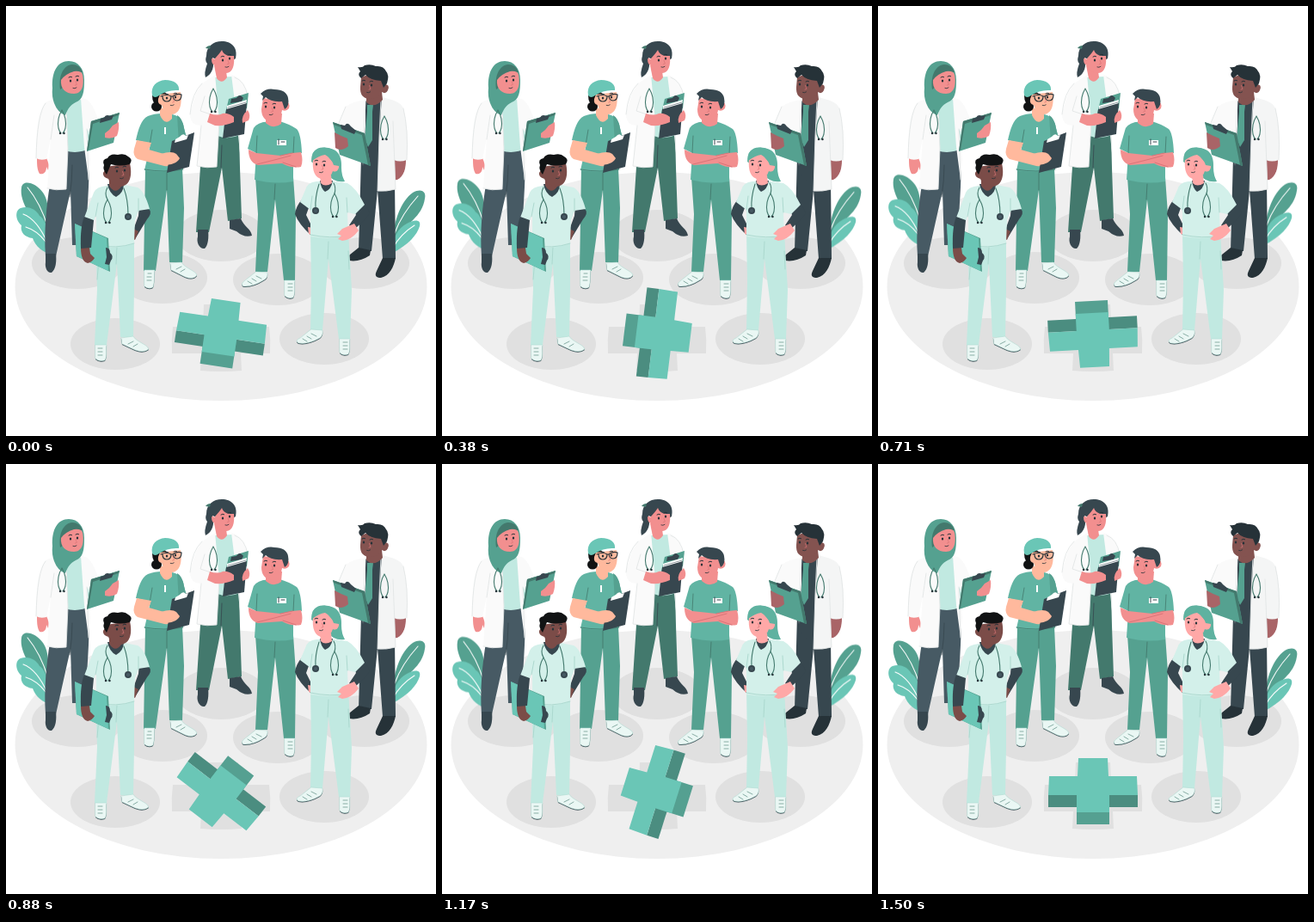
Write an HTML page with a canvas that moves like this. It is 500 px wide and 500 px high and loops after 1540 ms.

```html
<!DOCTYPE html>
<html lang="en">
<head>
<meta charset="utf-8">
<title>Medical team</title>
<style>
html, body { margin: 0; width: 100%; height: 100%; overflow: hidden; background: #fff; }
canvas { display: block; width: 500px; height: 500px; }
</style>
</head>
<body>
<canvas id="stage"></canvas>
<script>
const LOOP = 1540, STEPS = 37;
const canvas = document.getElementById('stage');
const ratio = window.devicePixelRatio || 1;
canvas.width = canvas.height = 500 * ratio;
const main = canvas.getContext('2d');
let ctx = main;

const C = {
  mint: '#6ac6b6', teal: '#55a190', scrub: '#61b4a3', deep: '#43796d', pale: '#c1e9e1', light: '#d3f0ea', fold: '#a9d6cc',
  black: '#111314', ink: '#263238', slate: '#37474f', grey: '#475a64', coat: '#fafafa', edge: '#e3e6e6',
  pink: '#f28f8f', blush: '#d97478', peach: '#ffb99d', rose: '#ffa8a7', brown: '#845350', palm: '#a96467', dark: '#7b4c48'
};

function fill(color, d) {
  ctx.fillStyle = color;
  ctx.fill(new Path2D(d));
}
function line(color, width, d) {
  ctx.strokeStyle = color;
  ctx.lineWidth = width;
  ctx.stroke(new Path2D(d));
}
function oval(color, x, y, rx, ry = rx, turn = 0) {
  ctx.fillStyle = color;
  ctx.beginPath();
  ctx.ellipse(x, y, rx, ry, turn, 0, 7);
  ctx.fill();
}
function layer(draw) {
  const sheet = document.createElement('canvas');
  sheet.width = sheet.height = 500 * ratio;
  ctx = sheet.getContext('2d');
  ctx.scale(ratio, ratio);
  ctx.lineCap = ctx.lineJoin = 'round';
  draw();
  ctx = main;
  return sheet;
}

// x, y: left eye; gap and drop lead to the right eye.
function face(x, y, gap, drop) {
  for (const [ex, ey] of [[x, y], [x + gap, y + drop]]) {
    oval(C.ink, ex, ey, 1.2, 1.5);
    line(C.ink, 1, `M${ex - 2} ${ey - 4}q2-1.6 3.6-.4`);
  }
  const mx = x + gap * 0.62, my = y + drop / 2;
  line(C.blush, 0.7, `M${mx + 1} ${my + 1}l1.4 4l-2 .6`);
  line(C.ink, 0.8, `M${mx - 2} ${my + 9}q2 1 4-.6`);
}
// Loop of the headset: narrow at the neck, open at the ear tips.
function stethoscope(x, y) {
  line(C.deep, 1.1, `M${x} ${y - 12}Q${x - 6} ${y - 2} ${x - 4} ${y + 9}q1 4 3 6M${x} ${y - 12}Q${x + 6} ${y - 2} ${x + 4} ${y + 9}q-1 4-3 6`);
  oval(C.ink, x - 2, y + 15, 1.2);
  oval(C.ink, x + 2.5, y + 15, 1.2);
}
function shoe(d, laces) {
  ctx.save();
  ctx.translate(0, 1);
  fill(C.slate, d);
  ctx.restore();
  fill('#eaf7f4', d);
  line(C.fold, 0.5, d);
  line(C.deep, 0.6, laces);
}

function floor() {
  oval('#efefef', 250, 326, 239.5, 133);
  const spots = [[83, 299, 53], [182, 316, 52], [250, 267, 52], [316, 318, 52], [417, 299, 52], [127, 393, 52], [370, 387, 52]];
  for (const [x, y, r] of spots) oval('#e0e0e0', x, y, r, 30);
  fill('#e0e0e0', 'M230 347H270L271 373H306Q308 388 307 404H273L274 424Q250 426 226 424L227 404H193Q192 388 194 373H229Z');
}

function plants() {
  fill(C.teal, 'M50 268C32 252 15 228 18 211C20 201 35 206 43 217C51 228 49 246 50 268Z');
  fill(C.mint, 'M52 288C43 287 34 279 31 270C22 269 16 263 18 255C10 248 11 237 17 235C27 232 35 237 39 244C47 249 50 263 52 288Z');
  line('#fff', 1.1, 'M25 211Q40 229 49 258M20 242Q36 248 48 275M23 257Q36 261 46 274');
  fill(C.teal, 'M450 272C451 250 459 227 473 217C484 211 489 217 487 224C484 245 466 253 450 272Z');
  fill(C.mint, 'M448 288C449 270 456 258 466 253C475 248 483 248 481 256C478 266 469 277 448 288Z');
  line('#fff', 1.1, 'M479 221Q460 242 452 264M475 255Q459 265 450 281');
}

function doctorInHijab() {
  fill(C.grey, 'M70 165L95 162C98 185 96 215 94 245L93 278H77L75 215L58 291H46C44 262 47 232 51 208Z');
  line(C.slate, 0.8, 'M77 185Q77 203 74 222');
  fill(C.slate, 'M46 288H58C59 297 58 306 53 310C48 311 45 304 46 298Z');
  fill(C.pale, 'M65 113L91 108L99 165Q83 173 69 168Z');
  fill(C.pink, 'M36 175L47 177C50 183 50 186 49 191L47 187C47 195 42 196 39 195C36 190 36 184 36 175Z');
  fill(C.coat, 'M58 109L70 118L72 165L70 213Q58 215 48 212L52 154L47 178Q40 180 35 177C35 149 37 126 44 115Q48 108 58 109Z');
  fill(C.coat, 'M87 107C94 107 98 111 103 121L109 136L122 141L118 154L101 153L94 143L98 178L96 202L91 164Z');
  line(C.edge, 0.9, 'M52 155L56 127M70 120L72 166L70 213Q58 215 48 212M35 177Q36 125 46 113M96 202L94 143');
  fill(C.teal, 'M99 134L132 124L125 159L94 169Z');
  fill(C.deep, 'M99 134L132 124L131 127L101 137L96 167L94 169Z');
  fill(C.slate, 'M110 131L114 130Q116 125 121 128L125 127L123 132L109 136Z');
  fill(C.pink, 'M115 148Q121 144 124 139L131 135Q132 143 129 151Q123 155 115 153Z');
  fill(C.teal, 'M54 95C53 76 60 64 73 64C84 64 91 73 91 86C91 99 90 109 81 112C75 115 72 119 69 127Q60 124 56 113Q53 105 54 95Z');
  fill(C.deep, 'M63 97C61 80 67 69 77 68Q86 68 89 77L84 77C73 77 67 83 66 95Z');
  fill(C.pink, 'M64 86Q69 79 79 76Q88 75 89 80C91 91 89 102 79 102C69 102 63 96 64 86Z');
  face(75, 87, 8, -1);
  stethoscope(65, 133);
}

function doctorWithBook() {
  fill(C.deep, 'M246 147H271L272 188L274 247L258 250L251 188L236 263H221L226 187Z');
  line(C.slate, 0.8, 'M251 162L250 188');
  fill(C.slate, 'M223 260H235C236 269 235 279 231 282C225 283 221 275 223 268Z');
  fill(C.slate, 'M260 249L273 247C276 256 285 259 286 267Q277 270 268 262L260 259Z');
  fill(C.pale, 'M243 83L264 82L272 150Q258 156 246 151Z');
  fill(C.coat, 'M243 80Q237 84 231 88C222 94 217 112 214 126C214 135 219 139 227 139L222 186Q234 189 245 187L248 134Z');
  fill(C.coat, 'M262 80C272 82 278 91 281 107L281 118L269 140L273 181L271 150Z');
  line(C.edge, 0.9, 'M231 105L226 122L238 126M227 139L222 186Q234 189 245 187L248 134M214 126Q216 101 228 90M266 83Q278 87 281 105');
  fill(C.pink, 'M242 69H255L257 83Q251 92 245 84Z');
  fill(C.slate, 'M233 58C233 47 241 41 251 41C262 41 270 48 267 61L258 67L240 60C243 70 240 79 232 83Q230 78 234 67Q231 64 233 58Z');
  fill(C.deep, 'M232 49Q234 46 238 46L237 50Z');
  fill(C.pink, 'M242 62C247 57 249 54 251 51C253 58 260 58 265 58C266 68 264 78 256 78C249 78 244 74 243 69Q239 68 239 62Q240 59 242 62Z');
  face(252, 63, 8, -2);
  stethoscope(241, 108);
  fill(C.teal, 'M259 108L282 101L280 119L255 125Z');
  fill(C.slate, 'M262 108L268 107Q271 102 274 105L276 107L274 111L261 113Z');
  fill('#fff', 'M257 116L280 109L279 116L257 123Z');
  fill(C.slate, 'M256 120L280 113L277 149L252 154Z');
  line('#879197', 0.9, 'M258 118L279 112');
  fill(C.pink, 'M237 125Q246 128 252 125Q258 124 265 129L265 135Q254 140 243 139L234 135Z');
  fill(C.pink, 'M281 121Q285 127 282 133L275 136Q273 128 281 121Z');
}

function doctorInTie() {
  fill(C.slate, 'M413 175H433L452 203L453 294H438L432 214L425 285H410Z');
  fill(C.ink, 'M410 281L424 284L423 290Q411 298 399 296Q396 292 400 289Z');
  fill(C.ink, 'M438 293H453C451 303 446 314 436 316Q427 316 431 308Z');
  fill(C.palm, 'M451 178L465 179C465 188 463 198 455 202Q450 203 448 197Z');
  fill(C.slate, 'M415 111L439 108L434 215L413 190Z');
  fill(C.teal, 'M420 115L427 115L426 123L426 156L421 164L417 154L420 123Z');
  fill(C.coat, 'M418 109Q403 111 395 117L385 141L391 154L407 151L413 158L415 186L418 140Z');
  fill('#f4f5f5', 'M437 106C449 109 459 111 462 119C467 138 468 160 466 179Q458 182 451 179L451 157L453 213Q442 216 432 215L434 151Z');
  line(C.edge, 0.9, 'M418 111L416 151M436 108L434 151L432 215Q442 216 453 213L450 134M462 119Q468 143 466 179M395 117L387 136');
  fill(C.teal, 'M380 135L417 148L424 186L388 173Z');
  fill(C.deep, 'M380 135L417 148L424 186L421 185L414 150L381 138Z');
  fill(C.slate, 'M389 138L394 139Q397 134 401 140L407 145L405 149L390 143Z');
  fill(C.palm, 'M382 147Q389 151 397 154L398 163Q390 170 383 165Z');
  fill(C.brown, 'M419 100H437L438 109Q428 120 419 112Z');
  fill(C.brown, 'M413 83Q425 77 440 86L440 91Q447 91 444 98Q442 103 437 100Q434 108 424 108Q411 108 412 94Z');
  fill(C.ink, 'M413 84Q408 80 412 76L409 71Q415 72 417 69Q424 67 430 70Q439 69 442 76Q446 80 443 90L439 95L436 87Q423 86 418 80Z');
  face(416, 91, 9, 1);
  stethoscope(440, 140);
}

function nurseWithGlasses() {
  fill(C.teal, 'M162 188H205L207 235L205 298H190L187 214L174 308H160Z');
  line(C.deep, 0.9, 'M187 194L187 214');
  shoe('M161 307H173C172 314 173 321 171 327Q166 330 161 326Z', 'M165 311L169 311M164 315L169 315M164 319L169 319');
  shoe('M191 299L204 298C208 305 221 308 222 313Q218 319 208 315L192 307Z', 'M198 306L204 303M203 309L208 306');
  fill(C.scrub, 'M165 128Q177 123 193 126Q205 128 207 142L210 154L206 165L206 190Q184 195 161 191L168 160L151 156C154 143 157 132 165 128Z');
  fill(C.teal, 'M199 127Q205 130 207 142L210 154L206 165L206 190L198 192L201 160Z');
  line(C.deep, 0.8, 'M170 144L167 162M161 190Q184 194 206 190');
  fill(C.peach, 'M152 156L169 159L166 167L187 173L198 169Q205 177 200 183Q192 187 184 186L153 178Q147 174 149 166Z');
  fill('#fff', 'M184 141h2v8h-2z');
  fill(C.peach, 'M179 118L193 123L193 131Q185 140 179 127Z');
  oval(C.black, 175, 117, 6, 5.5);
  fill(C.black, 'M170 104Q182 96 187 102L180 115Q170 117 170 104Z');
  fill(C.peach, 'M179 103L203 100C205 113 203 125 193 126Q183 125 181 115Q176 114 177 108Z');
  face(187, 107, 10, -1);
  fill(C.mint, 'M170 104C168 93 175 87 185 86C196 86 202 91 201 98Q188 97 178 104Q173 108 170 104Z');
  line(C.ink, 1.2, 'M180 105Q187 102 192 105Q192 111 187 111Q182 111 182 105M194 105Q199 101 204 103Q204 110 199 110Q195 110 194 105M192 105h2');
  fill(C.slate, 'M193 157L219 147L213 187L187 194Z');
  fill('#fff', 'M197 155L202 152Q206 147 209 151L212 150L210 155L196 159Z');
  fill(C.peach, 'M180 172Q193 168 198 172L202 177Q198 185 182 185Z');
}

function nurseCrossedArms() {
  fill(C.teal, 'M290 199H334L337 242L336 319H323L313 225L304 309H290L293 242Z');
  line(C.deep, 0.9, 'M313 207L312 225');
  shoe('M291 309L304 310Q305 315 301 318Q287 327 276 326Q272 323 278 319Z', 'M291 314L297 317M286 317L291 320M281 320L286 323');
  shoe('M324 319H336C335 326 337 333 334 339Q328 341 324 337Z', 'M328 323L333 323M328 327L333 327M328 331L333 331');
  fill(C.scrub, 'M299 135Q288 138 287 145L281 166L291 171L289 202Q313 208 334 204L334 173L344 171Q343 148 338 143Q329 137 318 134Z');
  line(C.deep, 0.8, 'M292 151L291 171M335 152L334 172');
  fill(C.pink, 'M282 167L291 171L319 174L333 171L343 170Q346 180 343 187Q332 189 321 183L293 185Q282 182 282 167Z');
  line(C.blush, 1, 'M292 184Q313 179 331 174M319 174L333 171M322 182L337 187');
  fill('#fff', 'M315 156h11v6h-11z');
  line(C.slate, 1, 'M317 155v6M320 158h4');
  fill(C.pink, 'M302 125H321L320 137Q311 144 302 136Z');
  fill(C.pink, 'M299 107L324 111Q331 111 329 119Q326 123 321 121Q319 134 309 135Q297 133 297 120Z');
  fill(C.slate, 'M298 110L299 105L296 102Q303 95 312 97Q326 97 328 107Q330 116 324 120L321 111Q308 112 302 106Z');
  face(302, 117, 10, 1);
}

function frontMan() {
  fill(C.pale, 'M104 268H149L149 330L148 385H133L129 299L117 394H103L106 329Z');
  line(C.fold, 0.9, 'M129 280L128 300M108 295L106 318');
  shoe('M104 394H117C116 401 118 407 115 412Q108 414 104 410Z', 'M107 398L112 398M107 402L112 402M107 406L112 406');
  shoe('M134 386L148 384C152 391 164 393 166 399Q160 404 150 400L135 393Z', 'M142 393L148 390M148 396L153 393');
  fill(C.slate, 'M155 230L167 237Q170 241 164 248L150 271L147 263L154 244Z');
  fill(C.dark, 'M148 259L154 262L150 272L147 271Z');
  fill(C.light, 'M117 209Q105 210 102 217L91 246L102 250L105 241L105 279Q128 284 149 276L150 249L154 238L167 236Q161 215 153 211L138 208Z');
  line(C.fold, 0.9, 'M107 229L104 245M154 224L154 239M105 278Q128 283 149 276');
  fill(C.teal, 'M80 253L119 270L121 309L82 291Z');
  fill(C.mint, 'M80 253L117 270L119 308L82 291Z');
  fill(C.slate, 'M116 281Q121 281 121 287Q126 291 122 296L120 301L115 300L117 292Z');
  fill(C.dark, 'M87 281L97 281L98 288L103 293Q100 298 95 299Q87 297 87 281Z');
  fill(C.slate, 'M91 245L102 249L99 281L87 282Q86 257 91 245Z');
  fill(C.slate, 'M118 207L137 207Q137 217 128 222Q120 218 118 207Z');
  fill(C.dark, 'M120 201H135L134 210Q127 220 120 209Z');
  fill(C.dark, 'M116 187L144 183C147 196 145 209 133 210Q121 209 119 201Q112 199 113 194Q115 190 117 192Z');
  fill(C.black, 'M117 196Q112 190 114 185Q111 178 118 177Q121 171 130 173Q138 171 142 175Q148 178 144 184Q132 187 122 184Z');
  face(129, 192, 9, -1);
  stethoscope(118, 237);
  line(C.deep, 1.1, 'M118 225Q114 218 118 211M137 212Q142 225 142 243');
  oval(C.slate, 142, 245, 4);
  oval(C.grey, 142, 245, 2);
}

function frontWoman() {
  fill(C.pale, 'M354 263H398L402 330L400 387H387L375 294L368 377H354L355 321Z');
  line(C.fold, 0.9, 'M375 274L374 294M398 285L399 306');
  shoe('M355 376L368 377Q369 383 365 386Q351 394 340 392Q335 389 342 386Z', 'M355 381L361 384M350 384L355 387M345 387L350 390');
  shoe('M388 387H400C399 394 401 400 398 405Q391 407 388 403Z', 'M392 391L397 391M392 395L397 395M392 399L397 399');
  fill('#5fb2a0', 'M355 181C355 169 362 163 372 165C385 165 391 174 390 188Q390 197 394 204Q381 206 375 196Z');
  fill(C.slate, 'M344 225L353 232L349 243L357 259L354 266Q340 253 336 242Q337 233 344 225Z');
  fill(C.slate, 'M403 232L415 227Q421 235 423 241Q413 254 404 260L399 255L407 243Z');
  fill(C.rose, 'M351 257L357 258L356 266L352 265Z');
  fill(C.light, 'M361 204Q350 205 348 214L342 228L354 237L354 268Q377 272 398 267L397 240L406 242L417 231Q407 211 397 206L381 204Z');
  line(C.fold, 0.9, 'M356 221L354 237M396 223L397 240M354 266Q377 271 398 267');
  fill(C.slate, 'M365 203H380Q378 214 371 216Q366 212 365 203Z');
  fill(C.rose, 'M365 197H378L379 206Q371 211 366 206Z');
  fill(C.rose, 'M357 177L371 171L381 183Q388 182 387 188Q385 194 380 192Q377 202 367 201Q355 199 357 177Z');
  fill('#5fb2a0', 'M356 180Q354 169 363 166Q376 161 386 172Q390 181 387 186L381 185Q379 177 371 173Q364 174 356 180Z');
  face(361, 184, 9, 1);
  stethoscope(382, 230);
  line(C.deep, 1.1, 'M382 218Q384 211 381 206M364 207Q359 223 360 236');
  oval(C.slate, 360, 238, 4);
  oval(C.grey, 360, 238, 2);
  fill(C.rose, 'M405 253L410 261Q402 272 391 273L386 271L390 267L385 265L391 259Z');
}

function people() {
  doctorWithBook();
  doctorInHijab();
  doctorInTie();
  nurseWithGlasses();
  nurseCrossedArms();
  frontMan();
  frontWoman();
}

// Upright cross around its own centre.
function cross() {
  fill('#4b8d80', 'M-52 4H52V18H-52Z');
  fill('#55a091', 'M-19 4H19V38H-19Z');
  fill(C.mint, 'M-17 -39H17L18 -18H51L52 4H19V24H-19V4H-52L-51 -18H-18Z');
}

const turns = [[0, 8.5], [5, 57], [13, 137], [17, 177], [24, 248], [32, 327], [36, 360]];
function angleAt(step) {
  const i = Math.max(1, turns.findIndex(([s]) => s >= step));
  const [s0, a0] = turns[i - 1], [s1, a1] = turns[i];
  return (a0 + (a1 - a0) * (step - s0) / (s1 - s0)) * Math.PI / 180;
}

const ground = layer(floor), leaves = layer(plants), team = layer(people);

function render(now) {
  const step = Math.floor((now % LOOP + 3) / LOOP * STEPS) % STEPS;
  const lift = 9.5 * (1 - Math.cos(step / STEPS * 2 * Math.PI)) / 2;
  main.setTransform(ratio, 0, 0, ratio, 0, 0);
  main.fillStyle = '#fff';
  main.fillRect(0, 0, 500, 500);
  main.drawImage(ground, 0, 0, 500, 500);
  main.drawImage(leaves, 0, -lift, 500, 500);
  main.drawImage(team, 0, 0, 500, 500);
  main.translate(250, 381);
  main.rotate(angleAt(step));
  cross();
}

let start;
function tick(now) {
  start ??= now;
  render(now - start);
  requestAnimationFrame(tick);
}
render(0);
requestAnimationFrame(tick);
</script>
</body>
</html>
```
